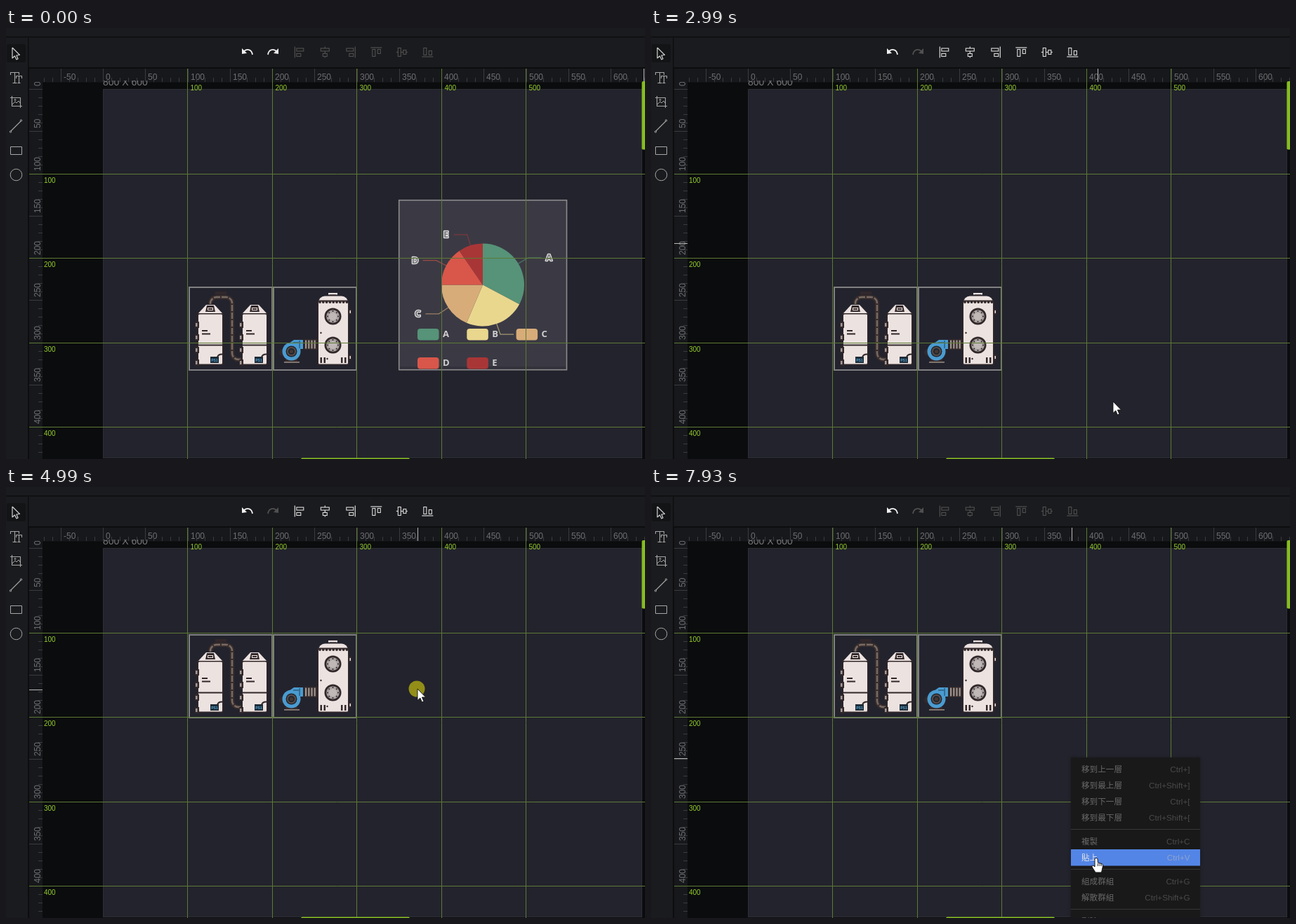
Animation, 910 px wide and 615 px high, one loop 7.99 s. Source, as an HTML page with a canvas:

```html
<!DOCTYPE html>
<html lang="zh-Hant">
<head>
<meta charset="utf-8">
<title>Editor</title>
<style>
html, body { margin: 0; width: 100%; height: 100%; overflow: hidden; background: #0b0c0d; }
canvas { display: block; }
</style>
</head>
<body>
<canvas id="stage" width="910" height="615"></canvas>
<script>
const g = document.getElementById('stage').getContext('2d');
const LOOP = 7990, UNIT = 1.205, X0 = 138, Y0 = 88, LAG = 58;
const SANS = '"Liberation Sans", Arial, sans-serif';
const CJK = '"Noto Sans CJK TC", "Noto Sans CJK", sans-serif';
const BOLD = 'bold 13px "Open Sans", sans-serif';
const CREAM = '#ece2e0', DARK = '#32282a', BLUE = '#4a9bd0', STEEL = '#24506c';
const GRAB = { t: 3640, y: 434, end: 4600 };

// eased moves: start, end, to x, to y
const moves = [
  [0, 560, 435, 388], [1130, 1320, 451, 412], [1470, 1870, 635, 306],
  [2090, 2600, 657, 564], [2900, 2990, 657, 533], [2990, 3620, 449, GRAB.y],
  [3800, 4560, 449, 275], [4700, 4920, 585, 288], [5080, 5390, 466, 281],
  [5930, 6150, 496, 350], [6160, 6400, 498, 400], [6640, 7040, 598, 386],
  [7350, 7510, 627, 500], [7580, 7860, 633, 529]
];
const presses = [[560, 900], [2840, 2930], [GRAB.t, GRAB.end], [4930, 5060], [6430, 6570], [7080, 7220]];
const groups = [
  [['移到上一層', 'Ctrl+]'], ['移到最上層', 'Ctrl+Shift+]'], ['移到下一層', 'Ctrl+['], ['移到最下層', 'Ctrl+Shift+[']],
  [['複製', 'Ctrl+C'], ['貼上', 'Ctrl+V']],
  [['組成群組', 'Ctrl+G'], ['解散群組', 'Ctrl+Shift+G'], ['隱藏', 'Ctrl+H']],
  [['刪除', 'Delete']]
];
const onItem = name => !/下一|貼上|群組/.test(name);
const menus = [
  layout(1930, 2930, 635, 306, onItem),
  layout(5420, 6600, 466, 281, onItem),
  layout(7340, LOOP, 598, 386, name => name === '貼上', true)
];

function layout(from, to, x, y, live, bare) {
  const rows = [], seps = [];
  let ry = y + 16.3;
  groups.forEach((list, n) => {
    if (n) { seps.push(ry - 6); ry += 11; }
    for (const [name, key] of list) {
      if (bare && name === '隱藏') continue;
      rows.push({ name, key, y: ry, live: live(name) });
      ry += 23;
    }
  });
  return { from, to, x, y, rows, seps, bare, w: 184, h: ry - 6 - y };
}

const within = (t, a, b) => t >= a && t < b;
const ramp = (t, a, d) => Math.max(0, Math.min(1, (t - a) / d));

function pointer(t) {
  let x = 907, y = 640;
  for (const [a, b, tx, ty] of moves) {
    const u = ramp(t, a, b - a), e = u * u * (3 - 2 * u);
    x += (tx - x) * e;
    y += (ty - y) * e;
  }
  return { x, y };
}

function box(x, y, w, h, c) { g.fillStyle = c; g.fillRect(x, y, w, h); }
function frame(x, y, w, h, c, lw = 1) { g.strokeStyle = c; g.lineWidth = lw; g.strokeRect(x, y, w, h); }
function disc(x, y, r, c) { g.fillStyle = c; g.beginPath(); g.arc(x, y, r, 0, 7); g.fill(); }
function ring(x, y, r, c, lw) { g.strokeStyle = c; g.lineWidth = lw; g.beginPath(); g.arc(x, y, r, 0, 7); g.stroke(); }
function trace(p) {
  g.beginPath();
  for (let i = 0; i < p.length; i += 2) g.lineTo(p[i], p[i + 1]);
}
function line(c, lw, ...p) { g.strokeStyle = c; g.lineWidth = lw; trace(p); g.stroke(); }
function poly(c, ...p) { g.fillStyle = c; trace(p); g.closePath(); g.fill(); }
function pill(x, y, w, h, r, c) { g.fillStyle = c; g.beginPath(); g.roundRect(x, y, w, h, r); g.fill(); }
function text(s, x, y, font, c, align = 'left') {
  g.font = font; g.fillStyle = c; g.textAlign = align;
  g.fillText(s, x, y);
}
function shade(u) { const v = Math.round(80 + 140 * u); return `rgb(${v},${v},${v})`; }

function undoIcon(cx, flip, c) {
  g.save(); g.translate(cx, 34); g.scale(flip, 1);
  g.strokeStyle = c; g.lineWidth = 1.8;
  g.beginPath(); g.moveTo(-5, -1); g.bezierCurveTo(0, -5, 6, -3, 7, 4); g.stroke();
  poly(c, -8, -5, -8, 3, -1, 2);
  g.restore();
}

function alignIcon(cx, side, turned, c) {
  g.save();
  if (turned) g.transform(0, 1, 1, 0, cx, 34.5); else g.translate(cx, 34.5);
  line(c, 1.2, side * 6.5, -8, side * 6.5, 8);
  const ws = side ? [10, 6] : [12, 6];
  ws.forEach((w, i) => {
    const x = side * 4 - w * (1 + side) / 2, y = i ? 2 : -5.5;
    box(x, y, w, 4, '#1a1b1e');
    frame(x, y, w, 4, c, 1.1);
  });
  g.restore();
}

function bigT(x, y, w, h, c) {
  line(c, 1.1, x - w, y + 3.5, x - w, y, x + w, y, x + w, y + 3.5);
  line(c, 1.1, x, y, x, y + h);
  line(c, 1.1, x - w / 2, y + h, x + w / 2, y + h);
}

function tools() {
  const c = '#a6a6a6';
  pill(1, 23, 27, 26, 3, '#131416');
  g.lineJoin = 'round';
  line('#d2d2d2', 1.2, 9, 28, 9, 43, 12.5, 40, 15, 45, 17, 44, 15, 39, 19.5, 38.5, 9, 28);
  bigT(12.5, 63.5, 6, 15, c);
  bigT(18.5, 68.5, 4, 10, c);
  line(c, 1.1, 8.5, 97, 8.5, 111.5, 23, 111.5);
  line(c, 1.1, 6, 99.5, 20.5, 99.5, 20.5, 114);
  line(c, 1, 9, 109, 13, 105, 15, 107, 18, 104, 20, 107);
  ring(13, 102.5, 1, c, 1);
  line(c, 1.1, 7, 147, 21, 133);
  ring(6.5, 148, 1.2, c, 1);
  ring(21.5, 132, 1.2, c, 1);
  frame(6.5, 169.5, 16, 11, c, 1);
  ring(14.5, 209.5, 8.3, c, 1);
  g.lineJoin = 'miter';
}

function toolbars(t) {
  const edge = '#0d0e0f';
  box(0, 0, 910, 57, '#1a1b1e');
  box(0, 14, 32, 601, '#1a1b1e');
  box(0, 12, 910, 1.5, edge);
  box(31, 14, 1.5, 601, edge);
  box(32, 56, 878, 1.5, edge);
  // alignment buttons fade in and out with each change of selection
  const on = [600, 3000, 3660, 5080, 5400, 7130].reduce((s, a, i) => s + ramp(t, a, 200) * (i % 2 ? -1 : 1), 0);
  undoIcon(344, 1, '#f2f2f2');
  undoIcon(380, -1, shade(1.1 - ramp(t, 600, 200) * 1.1));
  for (let i = 0; i < 6; i++) alignIcon(417.8 + i * 36.5, i % 3 - 1, i > 2, shade(on));
  tools();
}

function rulers(mark) {
  const tick = '#3a3b3e', label = '#6d6e71', font = '12px ' + SANS;
  box(33, 58, 877, 19.5, '#17181b');
  box(33, 58, 19, 557, '#17181b');
  for (let v = -70; v <= 640; v += 10) {
    const x = Math.round(X0 + v * UNIT) + .5, major = v % 50 === 0;
    line(tick, 1, x, major ? 58 : 71, x, 77);
    if (major) text(String(v), x + 3.5, 74, font, label);
  }
  g.save();
  g.beginPath(); g.rect(33, 77, 19, 538); g.clip();
  for (let v = 0; v <= 430; v += 10) {
    const y = Math.round(Y0 + v * UNIT) - .5, major = v % 50 === 0;
    line(tick, 1, major ? 33 : 46, y, 52, y);
    if (!major) continue;
    g.save(); g.translate(48.5, y - 4.5); g.rotate(-Math.PI / 2);
    text(String(v), 0, 0, font, label);
    g.restore();
  }
  g.restore();
  const mx = Math.round(mark.x) + .5, my = Math.round(mark.y) + .5;
  line('#b8b8b8', 1, mx, 58, mx, 77);
  line('#b8b8b8', 1, 33, my, 52, my);
}

function guides() {
  const c = '#5d7a34', lab = '#93cc2b', font = '10px ' + SANS;
  for (let v = 100; v <= 500; v += 100) {
    const x = Math.floor(X0 + v * UNIT) + .5, y = Math.floor(Y0 - .5 + v * UNIT) + .5;
    line(c, 1, x, 58, x, 615);
    text(String(v), x + 4, 89, font, lab);
    if (v > 400) continue;
    line(c, 1, 33, y, 910, y);
    text(String(v), 54, y + 12, font, lab);
  }
}

function silo(x) {
  g.save(); g.translate(x, 0);
  pill(-1.5, 37, 37, 75, 2, DARK);
  poly(CREAM, 0, 38, 11, 26, 23, 26, 34, 38);
  poly(DARK, 10, 36, 12, 27, 22, 27, 24, 36);
  frame(13.5, 30.5, 7, 3, CREAM);
  pill(0, 39.5, 34, 71, 1.5, CREAM);
  box(0, 82.5, 34, 2, DARK);
  for (let i = 0; i < 4; i++) {
    const y = 50 + i * 18;
    box(-5, y, 6, 9, DARK);
    box(-4, y + 2, 2.5, 5, '#a59a98');
  }
  box(5, 62, 8, 2, DARK);
  box(5, 66.5, 12, 2, DARK);
  g.strokeStyle = DARK; g.lineWidth = 2;
  g.beginPath(); g.moveTo(27, 101); g.quadraticCurveTo(28, 96, 35, 96.5); g.stroke();
  box(17, 100, 12, 9, '#1d2b36');
  text('PS1', 23, 107, 'bold 5px ' + SANS, '#55a8dc', 'center');
  g.restore();
}

function pipe(c, lw, dash) {
  g.strokeStyle = c; g.lineWidth = lw; g.setLineDash(dash);
  g.beginPath(); g.moveTo(291, 25);
  g.arcTo(291, 15, 301, 15, 9);
  g.arcTo(322, 15, 322, 30, 9);
  g.arcTo(322, 104, 335, 104, 9);
  g.lineTo(335, 104); g.stroke();
  g.setLineDash([]);
}

function tank() {
  pill(443.5, 20, 45, 92, 2, DARK);
  box(459, 9, 13, 2.5, CREAM);
  box(461, 11.5, 9, 2, DARK);
  pill(445, 13.5, 42, 12, [9, 9, 0, 0], CREAM);
  pill(445, 22, 42, 88.5, 1.5, CREAM);
  box(444, 19.5, 44, 2, DARK);
  for (let x = 447; x < 488; x += 4.8) disc(x, 22, 1.9, DARK);
  for (const y of [42.5, 83.5]) {
    disc(465.5, y, 12, DARK);
    disc(465.5, y, 9.3, '#a8a2a1');
    for (let a = 0; a < 6.2; a += Math.PI / 4) disc(465.5 + 7.5 * Math.cos(a), y + 7.5 * Math.sin(a), 1, DARK);
    disc(465.5, y, 5.6, '#bfb8b7');
  }
  for (const y of [66, 103]) disc(448.5 + (y > 70 ? 9 : 0), y, 1.2, DARK);
  for (const x of [447.5, 452.5, 477, 482]) box(x, 101, 2.5, 8, DARK);
  for (const y of [33, 98]) { box(488, y - 1, 4, 8, DARK); box(489.5, y + 1, 1.5, 4, CREAM); }
}

function blower() {
  disc(394, 94, 5, DARK);
  box(398, 104, 17, 2.5, '#3a2d2b');
  box(396, 107, 22, 1.8, '#8b7d76');
  disc(406.5, 92.5, 13, BLUE);
  poly(BLUE, 405, 79.5, 410, 76, 423, 76, 423, 89, 414, 89);
  box(417.5, 77, 1.2, 11, STEEL);
  line(STEEL, 1.2, 409, 80, 417, 80);
  disc(406.5, 92.5, 8, '#1e2730');
  ring(406.5, 92.5, 5.6, '#5a4b47', 2);
  disc(406.5, 92.5, 2.6, '#453733');
  box(424, 75, 20, 15, DARK);
  for (let x = 426; x < 442; x += 4.2) box(x, 76.5, 2.2, 12, '#a0968f');
}

function machines(top, picked) {
  g.save(); g.translate(0, top);
  pipe('#392d2c', 6, []);
  pipe('#776c65', 2.4, [9, 2]);
  box(298, 7, 16, 4, DARK);
  silo(274);
  silo(337);
  tank();
  blower();
  const grey = '#808082';
  frame(261, 1, 118, 118, grey, 2);
  frame(381, 1, 118, 118, picked ? '#3a88bd' : grey, 2);
  g.restore();
}

function chart(picked) {
  const cx = 679, cy = 366.5, r = 59, rad = Math.PI / 180;
  const col = ['#569378', '#ead78e', '#d7ac79', '#d9564a', '#a93637'];
  const ends = [0, 118, 203, 270, 325.5, 360];
  box(560, 246, 238.5, 242, '#3b3a44');
  box(560, 483, 238, 4, '#33323b');
  frame(559.7, 245.7, 238.8, 242, picked ? '#3a88bd' : '#8b8b8d', 1.6);
  col.forEach((c, i) => {
    const a = (ends[i] - 90) * rad, b = (ends[i + 1] - 90) * rad, m = (a + b) / 2;
    const dx = Math.cos(m), dy = Math.sin(m), side = Math.sign(dx);
    const x = cx + dx * (r + 16), y = cy + dy * (r + 16);
    g.globalAlpha = .6;
    line(c, 1.3, cx + dx * r, cy + dy * r, x, y, x + side * 19, y);
    g.globalAlpha = 1;
    g.fillStyle = c;
    g.beginPath(); g.moveTo(cx, cy); g.arc(cx, cy, r, a, b); g.fill();
    g.font = BOLD; g.textAlign = 'center'; g.lineJoin = 'round';
    g.strokeStyle = '#dedede'; g.lineWidth = 2.6;
    g.strokeText('ABCDE'[i], x + side * 30, y + 4);
    text('ABCDE'[i], x + side * 30, y + 4, BOLD, '#7a7a7c', 'center');
    g.lineJoin = 'miter';
  });
  col.forEach((c, i) => {
    const x = 586 + i % 3 * 70.3, y = i < 3 ? 429 : 470;
    pill(x, y, 30.5, 16.5, 4, c);
    text('ABCDE'[i], x + 36, y + 12, BOLD, '#d0d0d0');
  });
}

function selection(y, dragging) {
  const xs = [259.5, 379.5, 500.5], pink = '#c8139c';
  frame(259.5, y, 241, 120, '#7f9aa8');
  for (const x of xs) line(BLUE, 1.2, x, y, x, y + 120);
  if (dragging) {
    line(pink, 1.5, 381.5, Y0, 381.5, y + 120);
    line(pink, 3, 501.5, Y0, 501.5, y + 120);
    line(pink, 1.6, 259, y + 120.5, 505, y + 120.5);
  }
  for (const x of xs) for (const dy of [0, 60, 120]) {
    if (x === xs[1] && dy === 60) continue;
    box(x - 3, y + dy - 3, 6, 6, '#e9f3fa');
    frame(x - 3, y + dy - 3, 6, 6, BLUE, 1.4);
  }
}

const rowAt = (m, p) => m.rows.find(r => Math.abs(p.y - r.y) < 11.7 && within(p.x, m.x, m.x + m.w));

function drawMenu(m, p) {
  g.save(); g.shadowColor = 'rgba(0,0,0,.3)'; g.shadowBlur = 4;
  box(m.x, m.y, m.w, m.h, '#191919');
  g.restore();
  for (const y of m.seps) box(m.x, Math.round(y), m.w, 1, '#363636');
  const hot = rowAt(m, p);
  for (const r of m.rows) {
    const lit = hot === r && r.live;
    if (lit) box(m.x, Math.round(r.y - 11.5), m.w, 23.5, '#5385e6');
    text(r.name, m.x + 15, r.y + 4.7, '11.6px ' + CJK, r.live ? '#e6e6e6' : m.bare ? '#686868' : '#505050');
    text(r.key, m.x + 169.5, r.y + 4.2, '11.7px ' + SANS, lit ? '#8fa3cc' : r.live ? '#b4b4b4' : '#4a4a4a', 'right');
  }
}

function cursor(kind, p) {
  g.save(); g.translate(p.x + 1, p.y); g.lineJoin = 'round';
  if (kind === 'no') {
    const red = '#d0101c';
    disc(0, 1, 7.5, '#fff');
    ring(0, 1, 5.8, red, 2.4);
    line(red, 2.4, -4, -3, 4, 5);
  } else if (kind === 'hand') {
    g.beginPath(); g.moveTo(-2, 1.5);
    g.quadraticCurveTo(0, -1, 2, 1.5); g.lineTo(2.4, 7);
    g.lineTo(8, 8.5); g.quadraticCurveTo(10, 9, 9.5, 12); g.lineTo(7.5, 21);
    g.lineTo(-1, 21); g.lineTo(-6, 13);
    g.quadraticCurveTo(-6.5, 10.5, -4, 11); g.lineTo(-2, 13); g.closePath();
    g.fillStyle = '#fff'; g.fill();
    g.strokeStyle = '#17171c'; g.lineWidth = 1; g.stroke();
    for (const x of [2.5, 5, 7.3]) line('#17171c', .9, x, 8, x, 12);
  } else {
    trace([0, 0, 0, 16.5, 3.8, 13, 6.4, 19, 9, 17.8, 6.4, 12, 11.6, 12]);
    g.closePath();
    g.fillStyle = '#fff'; g.fill();
    g.strokeStyle = '#111'; g.lineWidth = .9; g.stroke();
  }
  g.restore();
}

function cursorKind(t, p, menu, top, chartOn) {
  if (menu && within(p.x, menu.x, menu.x + menu.w) && p.y > menu.y + 3) {
    const r = rowAt(menu, p);
    return !r ? 'arrow' : r.live ? 'hand' : 'no';
  }
  const overUnits = within(p.x, 261, 499) && within(p.y, top, top + 120);
  const overChart = chartOn && within(p.x, 560, 799) && within(p.y, 246, 488);
  return (overUnits || overChart) && !within(t, GRAB.t, 4700) ? 'hand' : 'arrow';
}

function draw(t) {
  const p = pointer(t), late = pointer(t - LAG);
  const menu = menus.find(m => within(t, m.from, m.to));
  const held = menu || menus.find(m => within(t - 70, m.from, m.to)) || late;
  const drag = t < GRAB.t ? 0 : pointer(Math.min(t - LAG, GRAB.end)).y - GRAB.y;
  const top = 369 + Math.round(drag);
  const chartOn = t < 2930;

  box(0, 0, 910, 615, '#0b0c0d');
  box(X0, Y0, 767, 525.5, '#23232d');
  frame(X0 + .5, Y0 - .5, 767, 526, '#2e2e37');
  if (chartOn) chart(t >= 1930);
  machines(top, within(t, 600, 1930) || within(t, 5400, 7120));
  rulers({ x: held.x + 1, y: held.y + 1 });
  g.save();
  g.beginPath(); g.rect(X0, 75, 70, 10); g.clip();
  text('800 X 600', X0, 81.5, '14px ' + SANS, '#77777a');
  g.restore();
  guides();
  if (within(t, GRAB.t, 4930)) selection(top, within(t, 3900, GRAB.end));
  pill(905.5, 76, 6, 97.5, 2, '#86bd20');
  pill(420, 613.5, 155, 4, 2, '#86bd20');
  toolbars(t);
  if (menu) drawMenu(menu, p);
  if (presses.some(([a, b]) => within(t, a, b))) disc(p.x, p.y, 11.5, 'rgba(190,184,16,.72)');
  cursor(cursorKind(t, p, menu, top, chartOn), p);
}

function tick(now) {
  draw(now % LOOP);
  requestAnimationFrame(tick);
}
draw(0);
requestAnimationFrame(tick);
</script>
</body>
</html>
```
